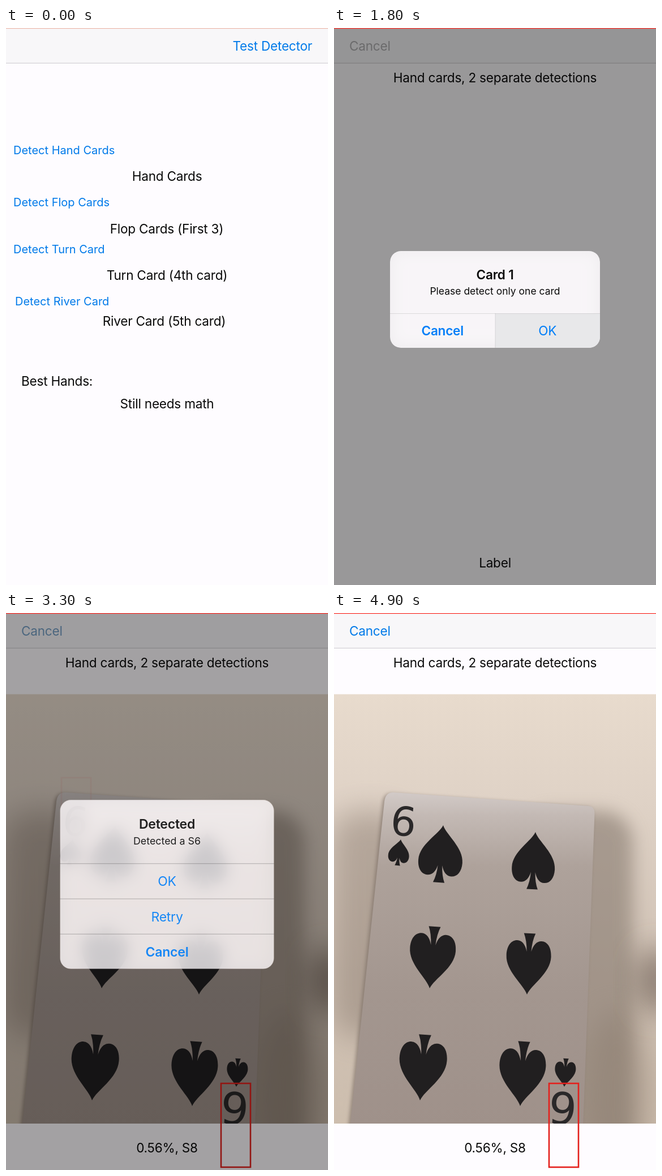
Recreate the animation shown at these times as an HTML page. Size 569 by 984 pixels, loop 5000 ms.

```html
<!DOCTYPE html>
<html lang="en">
<head>
<meta charset="utf-8">
<title>Card detector</title>
<style>
html, body { margin: 0; width: 100%; height: 100%; overflow: hidden; background: #fefcff; }
#stage { position: absolute; left: 0; top: 0; width: 569px; height: 984px; overflow: hidden; }
.layer { position: absolute; left: 0; top: 0; width: 569px; height: 984px; display: block; }
svg text { font-family: Inter, "Open Sans", sans-serif; white-space: pre; }
.alert { transform-origin: 284.5px 479.5px; }
/* Larger than the panel, so that the blur has no visible rim */
.glass {
  position: absolute; left: 59px; width: 451px; clip-path: inset(40px round 19px);
  background: rgba(255, 253, 255, .82);
  backdrop-filter: blur(14px) saturate(1.8) brightness(1.4);
}
#dim { background: #000; }
#line { position: absolute; left: 0; top: 0; width: 569px; height: 2px; }
</style>
</head>
<body>
<div id="stage">
  <svg class="layer" id="home" viewBox="0 0 569 984"></svg>
  <div class="layer" id="modal">
    <svg class="layer" id="sheet" viewBox="0 0 569 984"></svg>
  </div>
  <div class="layer" id="dim"></div>
  <div class="layer alert" id="ask">
    <div class="glass" style="top:354px;height:251px"></div>
    <svg class="layer" viewBox="0 0 569 984"></svg>
  </div>
  <div class="layer alert" id="found">
    <div class="glass" style="top:293px;height:373px"></div>
    <svg class="layer" viewBox="0 0 569 984"></svg>
  </div>
  <div id="line"></div>
</div>
<script>
const LOOP = 5000, STEP = 100;
const BLUE = '#007ae9', ALERT_BLUE = '#007ef8';
const $ = q => document.querySelector(q);

// Text sizes: body, button, alert message
const BODY = 22.6, BUTTON = 20, NOTE = 17.5;

function text(x, y, str, { size = BODY, fill = '#0a0a0a', anchor = 'middle', weight = 400, id = '' } = {}) {
  const gap = size === BODY ? -.24 : 0;
  return `<text id="${id}" x="${x}" y="${y}" font-size="${size}" fill="${fill}" text-anchor="${anchor}"` +
    ` font-weight="${weight}" letter-spacing="${gap}">${str}</text>`;
}
const rect = (x, y, w, h, fill, more = '') =>
  `<rect x="${x}" y="${y}" width="${w}" height="${h}" fill="${fill}" ${more}/>`;
const navBar = () =>
  rect(0, 0, 569, 984, '#fefcff') + rect(0, 0, 569, 62, '#f8f7f9') + rect(0, 61.5, 569, 1.2, '#d3d1d4');

// Spade from its tip to the foot of its stem
const SPADE = 'M0 0C.08 .16 .5 .36 .5 .63C.5 .79 .4 .88 .27 .88C.17 .88 .09 .82 .05 .7Q.06 .88 .13 1' +
  'L-.13 1Q-.06 .88 -.05 .7C-.09 .82 -.17 .88 -.27 .88C-.4 .88 -.5 .79 -.5 .63C-.5 .36 -.08 .16 0 0Z';
function spade(tx, ty, fx, fy, w) {
  const dx = fx - tx, dy = fy - ty, k = w / Math.hypot(dx, dy);
  return `<path d="${SPADE}" fill="#211f20" transform="matrix(${[dy * k, -dx * k, dx, dy, tx, ty]})"/>`;
}
const six = (x, y, size, turn) =>
  `<text transform="translate(${x} ${y}) rotate(${turn})" y="${size * .364}" font-size="${size}" ` +
  `text-anchor="middle" fill="#2a2829" style="font-family:'DejaVu Sans',sans-serif">6</text>`;

const stops = list => list.map(([o, c]) => `<stop offset="${o}" stop-color="${c}"/>`).join('');
const fade = (id, list) => `<linearGradient id="${id}" x1="0" y1="0" x2="0" y2="1">${stops(list)}</linearGradient>`;
const blur = (id, r) =>
  `<filter id="${id}" x="-60%" y="-60%" width="220%" height="220%"><feGaussianBlur stdDeviation="${r}"/></filter>`;
const frame = (id, x, y) =>
  rect(x, y, 52, 148, 'none', `id="${id}" stroke="#e4201c" stroke-width="2.6"`);

const CARD = 'M106 317L450 341Q461 342 460.500 354L440 910L28 910L89 333Q91 316 106 317Z';
const photo = () => `
  <defs>
    ${fade('wall', [[0, '#e8dbcd'], [.25, '#dfd2c6'], [.65, '#cfc1b4'], [1, '#cdbeae']])}
    ${fade('paper', [[0, '#d2cac7'], [.07, '#c3b9b4'], [.22, '#aea29b'], [.6, '#a3968f'], [1, '#9f918a']])}
    ${blur('soft', 15)}${blur('wide', 26)}${blur('thin', 3)}
    <clipPath id="crop"><rect y="143.500" width="569" height="758.500"/></clipPath>
  </defs>
  <g id="photo" clip-path="url(#crop)">
    ${rect(0, 143, 569, 760, 'url(#wall)')}
    <rect x="-5" y="350" width="140" height="400" rx="50" fill="#85766b" opacity=".45" filter="url(#wide)"/>
    <rect x="330" y="350" width="198" height="640" rx="55" fill="#877a70" opacity=".62" filter="url(#soft)"/>
    <ellipse cx="568" cy="650" rx="34" ry="60" fill="#64554c" opacity=".65" filter="url(#wide)"/>
    <ellipse cx="500" cy="850" rx="60" ry="150" fill="#8a7a6d" opacity=".45" filter="url(#wide)"/>
    <path d="${CARD}" fill="#75685f" opacity=".65" transform="translate(-3 2)" filter="url(#thin)"/>
    <path d="${CARD}" fill="url(#paper)"/>
    ${six(123, 367.500, 71, 6)}
    ${spade(118, 400, 112, 446, 37)}
    ${spade(193, 375, 185, 476, 78)}${spade(356, 387, 350, 488, 76)}
    ${spade(169, 663, 178, 554, 81)}${spade(341, 674, 346, 566, 79)}
    ${spade(152, 861, 161, 745, 84)}${spade(329, 871, 336, 757, 82)}
    ${spade(407, 837, 410, 787, 37)}
    ${six(404, 875, 78, 185)}
  </g>`;

const button = { size: BUTTON, fill: BLUE, anchor: 'start' };
$('#home').innerHTML = navBar() +
  text(541, 40, 'Test Detector', { fill: BLUE, anchor: 'end' }) +
  text(13, 223, 'Detect Hand Cards', { ...button, id: 'press' }) +
  text(284.5, 270, 'Hand Cards') +
  text(13, 315, 'Detect Flop Cards', button) +
  text(284, 362.5, 'Flop Cards (First 3)') +
  text(13, 397.5, 'Detect Turn Card', button) +
  text(284.5, 444.5, 'Turn Card (4th card)') +
  text(16, 489.5, 'Detect River Card', button) +
  text(279.5, 526, 'River Card (5th card)') +
  text(27, 631.5, 'Best Hands:', { anchor: 'start' }) +
  text(284.5, 671.5, 'Still needs math');

$('#sheet').innerHTML = navBar() +
  text(27, 40, 'Cancel', { anchor: 'start', id: 'back' }) +
  text(284.5, 96, 'Hand cards, 2 separate detections') +
  photo() + text(284.5, 952.5, 'Label', { id: 'label' }) +
  frame('boxA', 98, 291) + frame('boxB', 380, 831);

const action = (x, y, str, weight) => text(x, y, str, { fill: ALERT_BLUE, weight });
const rule = (y, alpha) => rect(99, y, 371, 1, `rgba(0,0,0,${alpha})`);
const heading = (y, title, note) =>
  text(284.5, y, title, { weight: 600 }) + text(284.5, y + 27.5, note, { size: NOTE });

$('#ask svg').innerHTML =
  '<path id="tap" d="M285 504.500H470V546a19 19 0 0 1-19 19H285Z" fill="#e8e8ea"/>' +
  heading(443.5, 'Card 1', 'Please detect only one card') +
  rule(504, .11) + rect(284.5, 504, 1, 61, 'rgba(0,0,0,.1)') +
  action(191.7, 543, 'Cancel', 600) + action(377.3, 543, 'OK');

$('#found svg').innerHTML =
  heading(382.5, 'Detected', 'Detected a S6') +
  rule(443, .28) + rule(504, .28) + rule(565, .28) +
  action(284.5, 482, 'OK') + action(284.5, 543.5, 'Retry') + action(284.5, 604.5, 'Cancel', 600);

// Critically damped spring, 0 to 1
function spring(ms, rate = 22.8) {
  const k = rate * Math.max(0, ms) / 1000;
  return k > 11 ? 1 : 1 - (1 + k) * Math.exp(-k);
}
const clamp = v => Math.min(1, Math.max(0, v));

const ALERTS = [
  { el: $('#ask'), open: 1211, close: 2130 },
  { el: $('#found'), open: 3129, close: 4429 },
];

function showAlert({ el, open, close }, t) {
  const inn = spring(t - open), left = 1 - spring(t - close);
  const on = inn * left;
  el.style.display = on > .002 ? 'block' : 'none';
  el.style.transform = inn < 1 ? `scale(${1.2 - .2 * inn})` : 'none';
  el.children[0].style.opacity = Math.sqrt(inn) * left;
  el.children[1].style.opacity = on;
  return { on, gray: clamp((t - open) / 260) * left ** 1.5 };
}

const show = (q, on) => { $(q).style.opacity = on ? 1 : 0; };

function draw(t) {
  const rise = spring(t - 660, 18);
  $('#modal').style.transform = `translateY(${(1 - rise) * 984}px)`;
  $('#press').style.opacity = t >= 500 && t < 800 ? .3 : 1;

  show('#photo', t >= 2900);
  show('#boxB', t >= 3100);
  $('#boxA').style.opacity = t >= 3100 ? clamp((3312 - t) / 212) : 0;
  $('#label').textContent = t >= 3100 ? '0.56%, S8' : 'Label';
  show('#tap', t >= 1700);

  const states = ALERTS.map(a => showAlert(a, t));
  const sum = key => states[0][key] + states[1][key];
  $('#dim').style.opacity = .4 * sum('on');
  const g = sum('gray');
  const mix = (a, b) => Math.round(a + (b - a) * g);
  $('#back').setAttribute('fill', `rgb(${mix(0, 176)},${mix(122, 176)},${mix(233, 178)})`);

  const tone = t < 100 ? '238,190,178' : '251,58,52';
  $('#line').style.background = `linear-gradient(rgb(${tone}) 50%, rgba(${tone},.3) 50%)`;
}

function tick() {
  const t = performance.now() % LOOP;
  draw(Math.floor(t / STEP) * STEP);
  requestAnimationFrame(tick);
}
tick();
</script>
</body>
</html>
```
